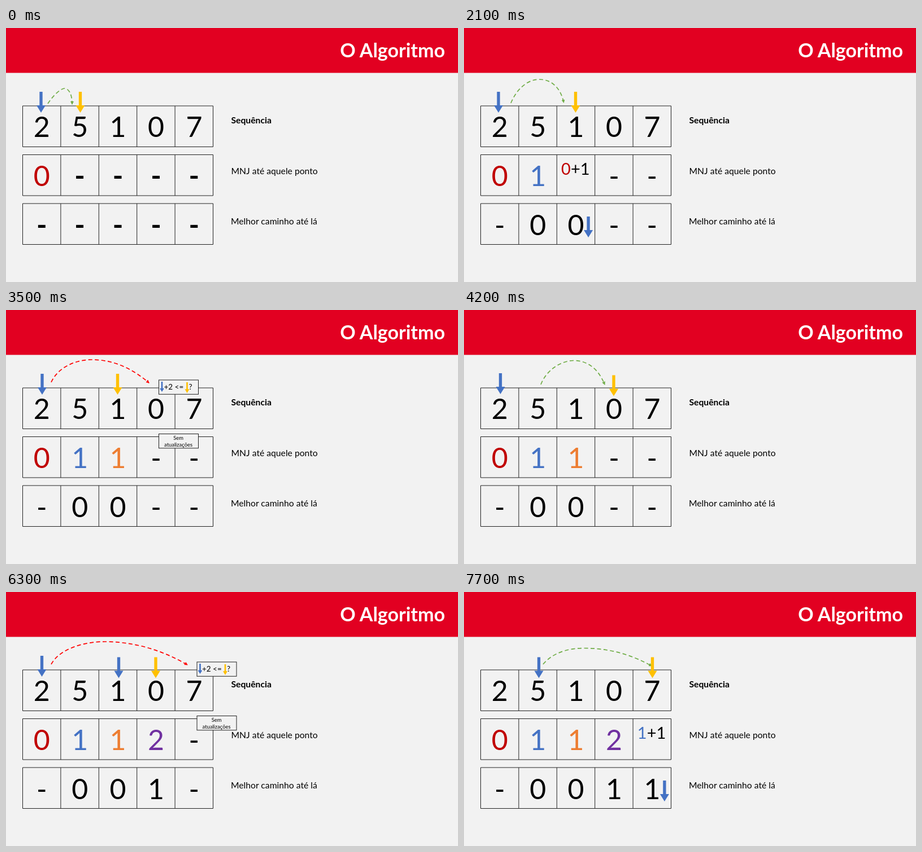
An HTML page for the animation above (8000 ms loop, 800 px wide and 450 px high).

```html
<!DOCTYPE html>
<html lang="pt">
<head>
<meta charset="utf-8">
<style>
html, body { margin: 0; width: 100%; height: 100%; overflow: hidden; background: #f2f2f2; }
svg { display: block; width: 800px; height: 450px; font-family: Lato, Carlito, sans-serif; }
.digit { font-size: 50px; text-anchor: middle; }
.sum { font-size: 29px; text-anchor: middle; }
.label { font-size: 15.7px; }
.note { font-size: 9.4px; text-anchor: middle; }
.check { font-size: 13.5px; }
.bold { font-weight: 700; }
.box { fill: #f2f2f2; stroke: #222; }
.arc { fill: none; stroke-width: 1.7; stroke-dasharray: 7 4.5; }
</style>
</head>
<body>
<svg viewBox="0 0 800 450">
  <defs id="heads"></defs>
  <rect width="800" height="79.5" fill="#e20021"/>
  <text x="777" y="52" text-anchor="end" font-size="34" font-weight="700" fill="#fff">O Algoritmo</text>
  <path id="grid" fill="none" stroke="#222"/>
  <text class="label bold" x="398.5" y="169">Sequência</text>
  <text class="label" x="398.5" y="259">MNJ até aquele ponto</text>
  <text class="label" x="398" y="348">Melhor caminho até lá</text>
  <g id="scene"></g>
</svg>
<script>
const STEP = 700, LOOP = 8000;
const BLUE = '#4472c4', YELLOW = '#ffc000', GREEN = '#70ad47', RED = '#ff0000';
const INK = ['#c00000', BLUE, '#ed7d31', '#7030a0', '#000'];
const $ = id => document.getElementById(id);
const column = c => 63.3 + 67.4 * c;

const text = (x, y, cls, s, fill = '#000') =>
  `<text x="${x}" y="${y}" class="${cls}" fill="${fill}">${s}</text>`;

const arrow = (x, y, color, w = 16, h = 37) => {
  const s = w / 6, neck = y + h * .65;
  return `<path fill="${color}" d="M${x - s} ${y}H${x + s}V${neck}H${x + w / 2}L${x} ${y + h}L${x - w / 2} ${neck}H${x - s}Z"/>`;
};
const blue = (x, y = 113) => arrow(x, y, BLUE);
const yellow = (x, y = 113) => arrow(x, y, YELLOW);

const arc = (d, color = GREEN) =>
  `<path class="arc" stroke="${color}" d="${d}" marker-end="url(#${color === RED ? 'red' : 'green'})"/>`;

const box = (x, y) => `<rect class="box" x="${x}" y="${y}" width="70" height="25.3"/>`;
const note = (x, y) => box(x, y) +
  text(x + 34.5, y + 10, 'note', 'Sem') + text(x + 34.5, y + 22, 'note', 'atualizações');
const check = (x, y) => box(x, y) + arrow(x + 5.5, y + 3, BLUE, 8, 18) +
  text(x + 9, y + 17, 'check', '+2 &lt;=') + arrow(x + 50, y + 4, YELLOW, 8, 19) +
  text(x + 53, y + 17, 'check', '?');

// Candidate jump into column c, with a pointer beside its predecessor
const sum = (c, from) =>
  text(column(c) - .8, 260, 'sum', `<tspan fill="${INK[from]}">${from}</tspan>+1`) +
  blue(column(c) + 22, 334);

const row = (values, y, weight, colored) => [...values].map((v, c) =>
  text(column(c), y, 'digit' + (v === '-' ? weight : ''), v, colored && v !== '-' ? INK[c] : '#000')).join('');

const arcs = {
  '01': 'M74 134C86 116 98 107 104 107C112 108 117 118 117 135',
  '02': 'M83 133C93 108 113 91 133 91C155 91 171 106 176.500 132',
  '12': 'M127 131C136 108 158 88 175 88C193 88 206 104 206 130',
  '13': 'M136 132C146 106 172 89.500 195 89.500C220 90 238 105 249 132',
  '23': 'M205 131C216 112 232 102 240 103C251 105 257 115 255.500 133',
  '03': 'M80 128C92 102 122 88 152 88C192 88 225 105 253 129',
  '04': 'M80 128C94 102 135 88 175 88C230 88 280 105 321 129',
  '14': 'M140 128C155 110 180 99.500 212 99.500C255 99.500 295 110 332 131'
};

// Each step: jump counts, best path, and the pointers and notes on top
const steps = [
  ['0----', '-----', arc(arcs['01']) + blue(62) + yellow(131.5)],
  ['0 ---', '-0---', arc(arcs['01']) + blue(62) + yellow(131.5) + sum(1, 0)],
  ['01 --', '-0---', arc(arcs['02']) + blue(62) + yellow(131.5) + text(column(2), 275, 'digit', '-')],
  ['01 --', '-00--', arc(arcs['02']) + blue(61) + yellow(197.5) + sum(2, 0)],
  ['011--', '-00--', arc(arcs['12']) + blue(60.5) + yellow(197.5) + note(182.5, 212.5)],
  ['011--', '-00--', arc(arcs['03'], RED) + blue(64) + yellow(197.5) + check(270.5, 124) + note(270.5, 219.5)],
  ['011--', '-00--', arc(arcs['13']) + blue(64.5, 112) + yellow(265, 115.5)],
  ['011 -', '-001-', arc(arcs['13']) + blue(130.5, 115.5) + yellow(265, 115.5) + sum(3, 1)],
  ['0112-', '-001-', arc(arcs['23']) + blue(130.5, 115.5) + yellow(265, 115.5) + note(265, 217)],
  ['0112-', '-001-', arc(arcs['04'], RED) + blue(63.5) + blue(199.5, 115.5) + yellow(265, 115.5) +
    check(338, 124) + note(338, 219.5)],
  ['0112-', '-001-', arc(arcs['14']) + blue(64) + yellow(333.5, 115.5)],
  ['0112 ', '-0011', arc(arcs['14']) + blue(132.5, 115.5) + yellow(333.5, 115.5) + sum(4, 1)]
];

$('heads').innerHTML = [['green', GREEN], ['red', RED]].map(([id, color]) =>
  `<marker id="${id}" markerUnits="userSpaceOnUse" markerWidth="7" markerHeight="6" refX="5" refY="3" orient="auto"><path d="M0 0L6 3L0 6Z" fill="${color}"/></marker>`).join('');

$('grid').setAttribute('d', [138, 224.5, 311].map(y =>
  `M29.5 ${y}H366.5V${y + 72.5}H29.5Z` +
  [1, 2, 3, 4].map(c => `M${29.5 + 67.4 * c} ${y}v72.5`).join('')).join(''));

let shown = -1;
function draw(now) {
  const n = Math.floor(now % LOOP / STEP);
  if (n !== shown) {
    shown = n;
    const [counts, path, marks] = steps[n];
    const weight = n ? '' : ' bold';
    $('scene').innerHTML = row('25107', 193, '') + row(counts, 280, weight, true) +
      row(path, 367, weight) + marks;
  }
  requestAnimationFrame(draw);
}
draw(performance.now());
</script>
</body>
</html>
```
